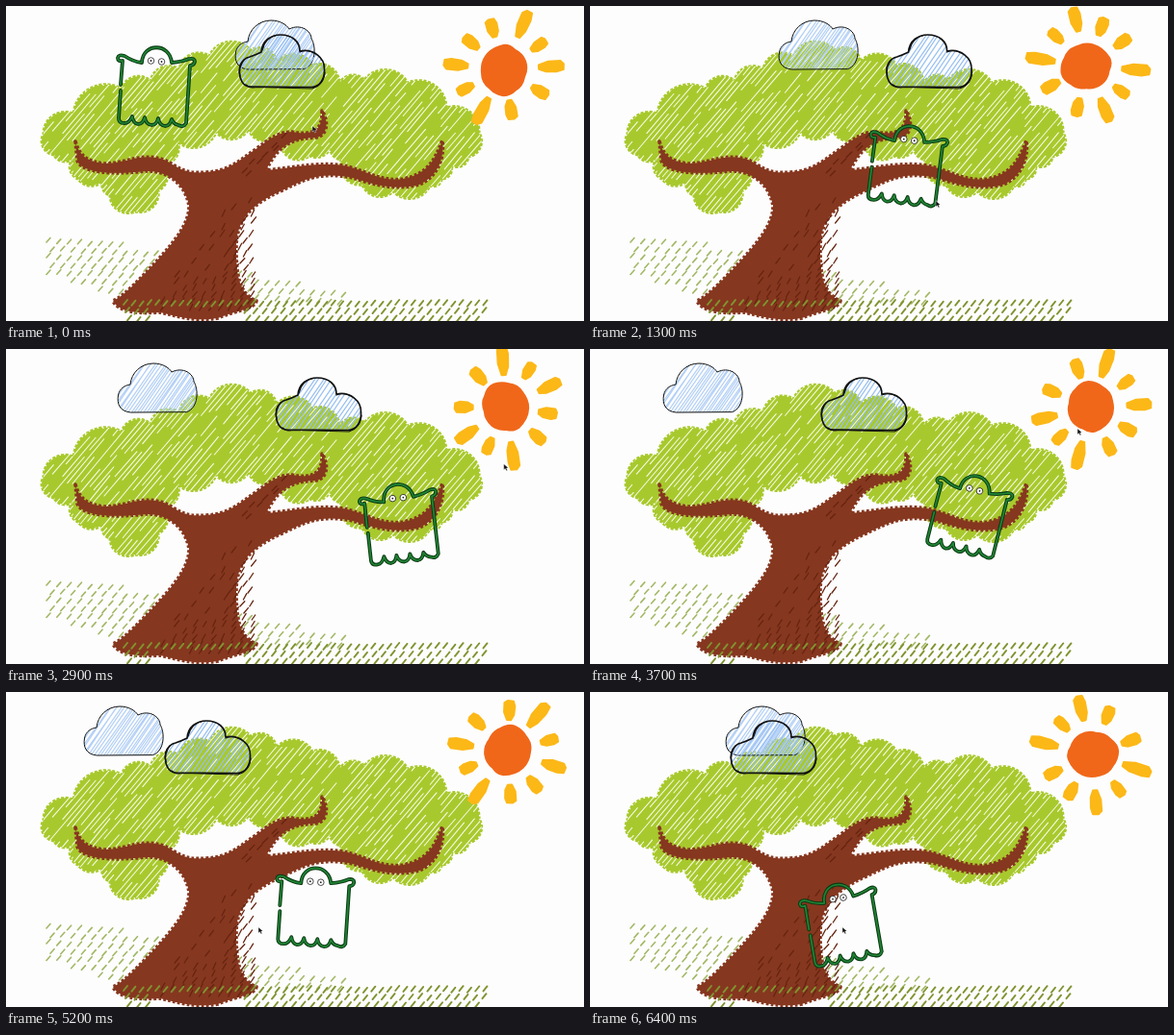
These frames come from a looping animation (600 by 328 pixels, 6500 ms). An HTML page:

```html
<!DOCTYPE html>
<html lang="en">
<head>
<meta charset="utf-8">
<title>Tree and ghost</title>
<style>
html, body { margin: 0; width: 100%; height: 100%; overflow: hidden; background: #fdfdfd; }
svg { display: block; width: 600px; height: 328px; }
path, line { fill: none; stroke-linejoin: round; stroke-linecap: round; }
.teeth { stroke-linecap: butt; }
</style>
</head>
<body>
<svg viewBox="0 0 600 328">
  <defs id="defs"></defs>
  <g id="scene"></g>
  <g id="sun"></g>
  <g id="thin"></g>
  <g id="thick"></g>
  <g id="ghost"></g>
  <path id="cursor" d="M0 0V6L1.5 4.7L2.7 7L3.8 6.4L2.8 4.3L4.6 4Z" style="fill:#111" stroke="#fff" stroke-width=".4"/>
</svg>
<script>
const $ = id => document.getElementById(id);

let seed = 11;
const rand = (a = 0, b = 1) => {
  seed = (seed * 16807) % 2147483647;
  return a + (b - a) * seed / 2147483647;
};
const n = v => +v.toFixed(1);
const stroke = (d, color, width, extra = '') =>
  `<path d="${d}" stroke="${color}" stroke-width="${width}" ${extra}/>`;
const clip = (id, d) => `<clipPath id="${id}"><path d="${d}"/></clipPath>`;
const dash = (x, y, dx, dy) => `M${n(x)} ${n(y)}l${n(dx)} ${n(-dy)}`;

// Closed outline of round lobes through the given cusps
function lobes(text) {
  const pts = text.split(' ').map(p => p.split(',').map(Number));
  return `M${pts[0]}` + pts.map((p, i) => {
    const q = pts[(i + 1) % pts.length];
    const r = n(Math.hypot(q[0] - p[0], q[1] - p[1]) * .6);
    return `A${r} ${r} 0 0 1 ${q}`;
  }).join('') + 'Z';
}

const leafShape = lobes('50,155 39,133 70,112 120,86 150,78 180,66 211,52 254,46 281,58 ' +
  '318,62 346,81 372,77 417,80 457,106 491,132 480,157 462,166 452,180 440,187 402,193 ' +
  '370,186 348,160 338,142 315,156 286,147 278,137 252,128 218,131 178,141 162,165 158,192 ' +
  '134,214 108,197 102,180 75,180 70,158');

const trunkShape = 'M72 141C76 156 85 162 102 164C125 164 140 152 164 160C182 169 184 175 208 173' +
  'C232 172 243 160 258 150C275 137 284 131 297 131C318 135 329 130 328 109' +
  'C336 121 333 135 322 137C292 138 281 149 270 171C300 168 330 161 355 167C376 173 391 183 412 180' +
  'C438 175 445 160 453 140C456 163 444 180 429 186C403 193 379 185 360 179' +
  'C326 172 309 181 287 192C252 207 239 225 239 252C239 280 242 300 260 307' +
  'C258 316 238 317 220 325C194 329 178 323 160 319C136 321 116 318 111 307' +
  'C124 301 140 283 156 266C177 243 190 226 190 208C185 181 163 171 145 172' +
  'C112 176 78 174 74 161Z';

function leafStreaks() {
  let d = '';
  for (let v = -230; v < 230; v += rand(3.6, 6.4))
    for (let u = -280 + rand(0, 40); u < 280; u += rand(8, 36)) {
      const len = rand(22, 70);
      d += dash(u, v, len, rand(-.7, .7));
      u += len;
    }
  return d;
}

function trunkMarks() {
  let d = '';
  for (let y = 205; y < 322; y += 7)
    for (let x = 150 + rand(0, 8); x < 256; x += 10) {
      const edge = 238 - (y - 200) * .62;
      if (x > edge - 12 && rand() < .25 + (x - edge + 12) / 100) d += dash(x, y, rand(3, 5), rand(5, 7));
    }
  for (let i = 0; i < 9; i++) d += dash(244 + i * 5 + rand(-3, 3), 176 - i * 4.5 + rand(-3, 6), 5, 5);
  return d;
}

function paleGrass() {
  let d = '';
  for (let r = 0; r < 10; r++)
    for (let x = 42 + (r % 2) * 4; x < 350; x += 10.8) {
      const y = 247 + r * 8 + (x - 42) * .05 + rand(-1, 1);
      const top = 243 + Math.max(0, x - 90) * .23;
      const low = Math.min(312, 282 + (x - 42) * .33);
      if (y > top && y < low) d += dash(x, y, 4, 4.5);
    }
  return d;
}

function darkGrass() {
  let d = '';
  for (let r = 0; r < 3; r++)
    for (let x = 122 + r * 2; x < 496; x += r ? 9.5 : 8.3)
      if (r === 0 || x > 244 || x < 150) d += dash(x, 312 + r * 8 + rand(-1, 1), 4, 5);
  return d;
}

$('scene').innerHTML =
  stroke(paleGrass(), '#a3b866', 1.6) +
  `<path d="${leafShape}" style="fill:#a8c92d"/>` +
  stroke(leafShape, '#a8c92d', 3, 'class="teeth" stroke-dasharray="3 1.6"') +
  `<g clip-path="url(#leafClip)"><g transform="translate(265 125) rotate(-50)">` +
  stroke(leafStreaks(), '#fbfdf2', .95) + '</g></g>' +
  `<path d="${trunkShape}" style="fill:#86371f"/>` +
  stroke(trunkShape, '#86371f', 3.6, 'class="teeth" stroke-dasharray="2.8 2.2"') +
  stroke(trunkMarks(), '#662410', 1.3) +
  stroke(darkGrass(), '#7f9430', 1.9);

// Sun: x, y, length and width of each ray
const hub = [518.6, 63.6];
const rays = [[566, 63, 28, 13], [553, 41, 20, 12], [537, 19, 31, 13], [505, 23, 21, 13], [483, 38, 21, 13],
  [467, 61, 27, 13], [477, 86, 20, 12], [494, 109, 32, 13], [524, 108, 22, 13], [554, 89, 21, 13]];
const ray = ([x, y, l, w]) => {
  const a = n(Math.atan2(y - 66, x - 517) * 180 / Math.PI);
  const h = l / 2, k = w / 2;
  return `<path transform="translate(${x} ${y}) rotate(${a})" style="fill:#fcb817" stroke="#fcb817" stroke-width="2"
    d="M${1 - h} ${-k * .35}L${-h * .2} ${1 - k}L${h * .7} ${1 - k}L${h - 1} ${-k * .3}L${h - 1.5} ${k * .6}L${h * .4} ${k - 1}L${-h * .4} ${k * .75}L${1 - h} ${k * .3}Z"/>`;
};
$('sun').innerHTML = rays.map(ray).join('') +
  '<path style="fill:#f0671a" d="M516 40Q523 39 529 45Q537 49 540 57Q543 66 539 74Q537 84 530 88Q523 95 515 94' +
  'Q506 92 501 86Q493 80 493 70Q492 59 497 52Q503 43 516 40Z"/>';

// Clouds, with the left edge at x = 0
const thinShape = 'M13 66C2 65 -1 57 .5 48C2 41 7 38 13 37C14 25 24 15 37 15C46 15 53 19 56 24' +
  'C68 18 79 26 79 34C84 42 84 61 72 65.5Z';
const thickShape = 'M11 84C-2 81 -2 56 12 53Q18 51 24 48C25 36 34 30 44 30C56 30 64 37 64 47' +
  'C78 44 90 54 89.5 66C90 77 84 84 76 84.5Z';
const thickRetrace = 'M8 82Q12 86 20 84.5L77 86Q89 82 90 69M2 73Q-1 62 6 56M25 46Q28 33 40 30.5M64 48Q70 45 77 48';

$('defs').innerHTML = clip('leafClip', leafShape) + clip('thinClip', thinShape) + clip('thickClip', thickShape);

function cloudHatch(step) {
  let d = '';
  for (let x = -50; x < 95; x += step + rand(-.7, .7)) d += dash(x, 90, 55 + rand(-2, 2), 80);
  return d;
}
const cloud = (id, shape, step, blue, width) =>
  `<g clip-path="url(#${id}Clip)">${stroke(cloudHatch(step), blue, 1.2)}</g>` + stroke(shape, '#111', width);
$('thin').innerHTML = cloud('thin', thinShape, 3, '#b3d0f7', 1);
$('thick').innerHTML = cloud('thick', thickShape, 4.8, '#96bff2', 1.7) + stroke(thickRetrace, '#111', 1.2);

// Ghost
const body = 'M119 82L121 57Q116 58 116 54Q117 50 123 52Q132 58 141 59C142 38 170 38 172 59' +
  'Q183 58 190 55Q196 54 196 58Q195 62 191 62L187 122Q184 127 179 124Q174 123 172 118Q170 125 165 125' +
  'Q159 124 158 117Q156 124 151 124Q145 123 144 116Q142 123 137 123Q132 122 131 115Q128 122 123 122Q117 122 117 117L119 88';
const eye = (x, y) => `<circle cx="${x}" cy="${y}" r="3.3" fill="#fff" stroke="#222" stroke-width=".8"/>` +
  `<circle cx="${x}" cy="${y}" r=".9" fill="#222"/>`;
$('ghost').innerHTML = stroke(body, '#0c3a14', 3.8) + stroke(body, '#1f8534', 1.7) + eye(150.5, 57) + eye(161.5, 58);

// Piecewise linear track of [time, ...values]
function track(keys, t) {
  let i = 1;
  while (i < keys.length - 1 && keys[i][0] < t) i++;
  const a = keys[i - 1], b = keys[i];
  const f = Math.min(1, (t - a[0]) / (b[0] - a[0]));
  return a.slice(1).map((v, k) => n(v + (b[k + 1] - v) * f));
}
const sunTurn = [[0, 0], [1.3, 71], [2.2, 129], [3.7, 171], [4.6, 179], [5.7, 203], [6.4, 260]];
const ghostPath = [[0, 155, 85], [1.3, 328.6, 166.8], [2.2, 426, 190.4], [3.7, 393.3, 173.3],
  [4.6, 385, 204.7], [5.7, 266.3, 242.3], [6.4, 263, 241.8]];
const cursorPath = [[0, 318, 125], [1.3, 359, 203], [2.2, 526, 152], [3.7, 506, 83], [4.6, 262, 245], [6.4, 262, 245]];

const place = (id, value) => $(id).setAttribute('transform', value);

function draw(t) {
  const thinX = Math.min(238 + 50 * t, 41 + 50 * Math.abs(t - 4.4));
  const thickX = Math.max(Math.min(241 + 50.5 * t, 333 - 50 * (t - 1.82)), 125 + 50 * (t - 6));
  const sway = 17 * (1 - 2 * Math.abs((t + 1.4) % 2 - 1));
  place('thin', `translate(${n(thinX)})`);
  place('thick', `translate(${n(thickX)})`);
  place('sun', `rotate(${track(sunTurn, t)} ${hub})`);
  place('ghost', `translate(${track(ghostPath, t)}) rotate(${n(sway - 3.4)}) translate(-155 -85)`);
  place('cursor', `translate(${track(cursorPath, t)})`);
}

function tick() {
  draw(Math.floor(performance.now() % 6500 / 100) / 10);
  requestAnimationFrame(tick);
}
tick();
</script>
</body>
</html>
```
